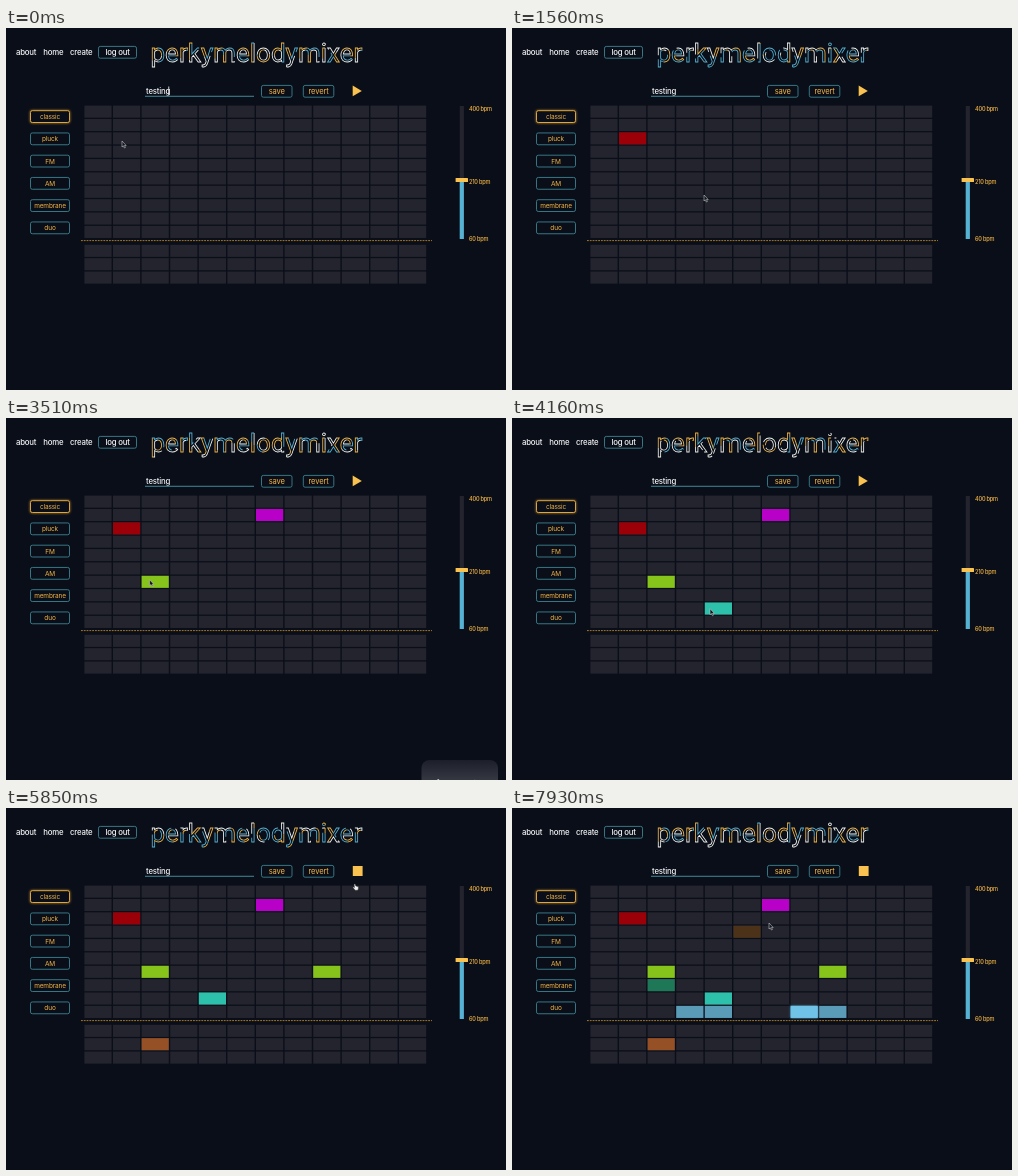
These frames come from a looping animation (500x362 px, 8 s). An HTML page:

```html
<!DOCTYPE html>
<html lang="en">
<head>
<meta charset="utf-8">
<title>Step sequencer</title>
<style>
  html, body { margin: 0; width: 100%; height: 100%; overflow: hidden; background: #0a0e18; }
  svg { display: block; width: 100vw; height: 100vh; font-family: Inter, "Open Sans", sans-serif; }
  .title { font: 26px Roboto, sans-serif; fill: none; stroke-width: .85; }
  .nav { font-size: 7.8px; font-weight: 500; letter-spacing: -.2px; fill: #f4f5f7; }
  .action { font-size: 7.6px; letter-spacing: -.15px; fill: #f3b545; }
  .voice { font-size: 6.5px; letter-spacing: -.15px; fill: #f3b545; }
  .tempo { font-size: 5.6px; font-weight: 500; letter-spacing: -.2px; fill: #f3b545; }
  .mid { text-anchor: middle; }
</style>
</head>
<body>
<svg id="stage" viewBox="0 0 500 362">
  <defs>
    <linearGradient id="fade" x2="0" y2="1">
      <stop offset="0" stop-color="#1c1f2a"/>
      <stop offset=".35" stop-color="#363942"/>
    </linearGradient>
    <filter id="glow" x="-30%" y="-60%" width="160%" height="220%">
      <feGaussianBlur stdDeviation="1.3"/>
    </filter>
  </defs>
  <rect width="500" height="362" fill="#0a0e18"/>
</svg>
<script>
const LOOP = 8000, STEP = 130;
const PLAY_AT = 5590, BEAT_AT = 5810, BEAT = 60000 / 210;
const TRAVEL = 300;
const GOLD = '#f9c250', DIM = '#23242d', TEAL = '#3b8391', BLUE = '#56b2d3';
const stage = document.getElementById('stage');

function add(tag, attrs, parent = stage, text) {
  const el = document.createElementNS('http://www.w3.org/2000/svg', tag);
  for (const key in attrs) el.setAttribute(key, attrs[key]);
  if (text) el.textContent = text;
  parent.append(el);
  return el;
}
const box = (x, y, width, height, attrs, parent) => add('rect', { x, y, width, height, ...attrs }, parent);
const label = (text, x, y, attrs, parent) => add('text', { x, y, ...attrs }, parent, text);
const show = (el, on) => el.setAttribute('display', on ? 'inline' : 'none');
const clamp = u => Math.min(1, Math.max(0, u));
const ease = u => u * u * (3 - 2 * u);
const ramp = (t, from, length) => ease(clamp((t - from) / length));

function button(text, x, y, width, cls, stroke = TEAL) {
  box(x, y, width, 11.8, { rx: 1.8, fill: '#0a0e18', stroke, 'stroke-width': .9 });
  label(text, x + width / 2, y + 8.5, { class: `${cls} mid` });
}

// Header
label('about', 10, 27, { class: 'nav' });
label('home', 37.2, 27, { class: 'nav' });
label('create', 64, 27, { class: 'nav' });
button('log out', 92.5, 18.4, 38, 'nav');

const DASH = 20, CYCLE = 64;
const strokes = ['#f2f3ee', '#f0b545', BLUE].map(stroke =>
  label('perkymelodymixer', 144.5, 34, { class: 'title', stroke, 'stroke-dasharray': `${DASH} ${CYCLE - DASH}` }));

label('testing', 140, 66, { class: 'nav' });
box(139, 67.8, 109, .9, { fill: '#4797a8' });
const caret = box(162.4, 58.5, .8, 8.5, { fill: '#fff' });
button('save', 255.5, 57.4, 30.5, 'action');
button('revert', 297.3, 57.4, 30.5, 'action');
const playIcon = add('path', { d: 'M346.7 57.5L355.8 62.9L346.7 68.3Z', fill: GOLD });
const stopIcon = box(346.8, 58, 9.8, 10, { fill: GOLD });

// Instruments
box(24.5, 82.7, 39, 11.8, { rx: 2, fill: 'none', stroke: '#b8822a', 'stroke-width': 1.4, filter: 'url(#glow)' });
['classic', 'pluck', 'FM', 'AM', 'membrane', 'duo'].forEach((name, i) =>
  button(name, 24.5, 82.7 + i * 22.25, 39, 'voice', i ? TEAL : '#f0b545'));

// Tempo slider
box(453.7, 78, 4.2, 75, { fill: DIM });
box(453.7, 152, 4.2, 59, { fill: BLUE });
box(449.6, 150, 12.4, 4, { rx: .6, fill: GOLD });
label('400 bpm', 463, 83.2, { class: 'tempo' });
label('210 bpm', 463, 155.6, { class: 'tempo' });
label('60 bpm', 463, 213, { class: 'tempo' });

// Grid: ten melodic rows, a divider, three drum rows
const cellX = col => 78.4 + col * 28.6;
const cellY = row => 77.6 + row * 13.36 + (row < 10 ? 0 : 5.6);
const cell = (row, col, attrs, parent) => box(cellX(col), cellY(row), 27.2, 12.1, attrs, parent);
for (let row = 0; row < 13; row++)
  for (let col = 0; col < 12; col++) cell(row, col, { fill: DIM });
add('path', { d: 'M75 212.6H426', stroke: '#b9842c', 'stroke-width': .9, 'stroke-dasharray': '1.8 1' });

const tones = ['', '#b900c9', '#9b0008', '#4c3219', '', '', '#86c31b', '#1e7858', '#2dc0aa', '#5a9bb8', '', '#965026'];
const notes = [], stops = [];

function moveTo(at, x, y) { stops.push({ at, x, y }); }

function place(at, row, col) {
  moveTo(at, cellX(col) + 8, cellY(row) + 4);
  const g = add('g', {});
  const halo = cell(row, col, { fill: tones[row], filter: 'url(#glow)' }, g);
  cell(row, col, { fill: tones[row] }, g);
  notes.push({ at, col, g, halo });
}

// The session: pointer moves and placed notes in order
moveTo(0, 116, 113);
place(520, 2, 1);
moveTo(910, 192, 167);
place(2210, 1, 6);
place(3250, 6, 2);
place(3900, 8, 4);
place(4420, 11, 2);
place(4960, 6, 8);
moveTo(PLAY_AT, 349, 63);
moveTo(PLAY_AT + 260, 348, 76);
place(6630, 7, 2);
moveTo(7020, 173, 202);
for (const col of [3, 4, 7, 8]) place(6820 + col * 110, 9, col);
place(7800, 3, 5);
moveTo(7930, 257, 115);

// Corner panel
const panel = add('g', {});
box(415.5, 0, 76.5, 60, { rx: 8, fill: 'url(#fade)' }, panel);
label('1 new note', 453, 25.5, { class: 'mid', style: 'font-size:9px;fill:#b9bcc6' }, panel);

// Pointer
const pointer = add('g', {});
const arrow = add('path', { d: 'M0 0V6L1.4 4.8L2.4 7L3.4 6.5L2.5 4.5H4.2Z', fill: '#10131b', stroke: '#c4c6cc', 'stroke-width': .6 }, pointer);
const hand = add('path', { d: 'M0 0L1.2 .2L1.8 2L4.4 2.8L4.3 5.2L3.4 6.2H1.2L-1 3.6L-.4 3L.6 3.6Z', fill: '#f2f2f2', stroke: '#333', 'stroke-width': .4 }, pointer);

// Rest at each stop, then glide so as to arrive at the next one on time
function pointerAt(t) {
  const i = stops.findIndex(s => s.at > t);
  if (i < 0) return stops[stops.length - 1];
  const a = stops[i - 1], b = stops[i];
  const length = Math.min(TRAVEL, b.at - a.at);
  const k = ramp(t, b.at - length, length);
  return { x: a.x + (b.x - a.x) * k, y: a.y + (b.y - a.y) * k };
}

function draw(t) {
  strokes.forEach((el, i) => el.setAttribute('stroke-dashoffset', -(i * DASH + t / 4000 * CYCLE)));

  show(caret, t < 520);
  show(playIcon, t < PLAY_AT);
  show(stopIcon, t >= PLAY_AT);

  const beat = t < BEAT_AT ? -1 : Math.floor((t - BEAT_AT) / BEAT) % 12;
  for (const { at, col, g, halo } of notes) {
    show(g, t >= at);
    show(halo, col === beat);
    g.style.filter = col === beat ? 'brightness(1.25)' : 'none';
  }

  const rise = ramp(t, 3120, 390) - ramp(t, 3640, 390);
  panel.setAttribute('transform', `translate(0 ${362 - 20 * rise})`);

  const { x, y } = pointerAt(t);
  pointer.setAttribute('transform', `translate(${x} ${y})`);
  const pointing = Math.abs(t - PLAY_AT) < TRAVEL;
  show(hand, pointing);
  show(arrow, !pointing);
}

const start = performance.now();
function frame() {
  const t = (performance.now() - start) % LOOP;
  draw(Math.floor(t / STEP) * STEP);
  requestAnimationFrame(frame);
}
frame();
</script>
</body>
</html>
```
